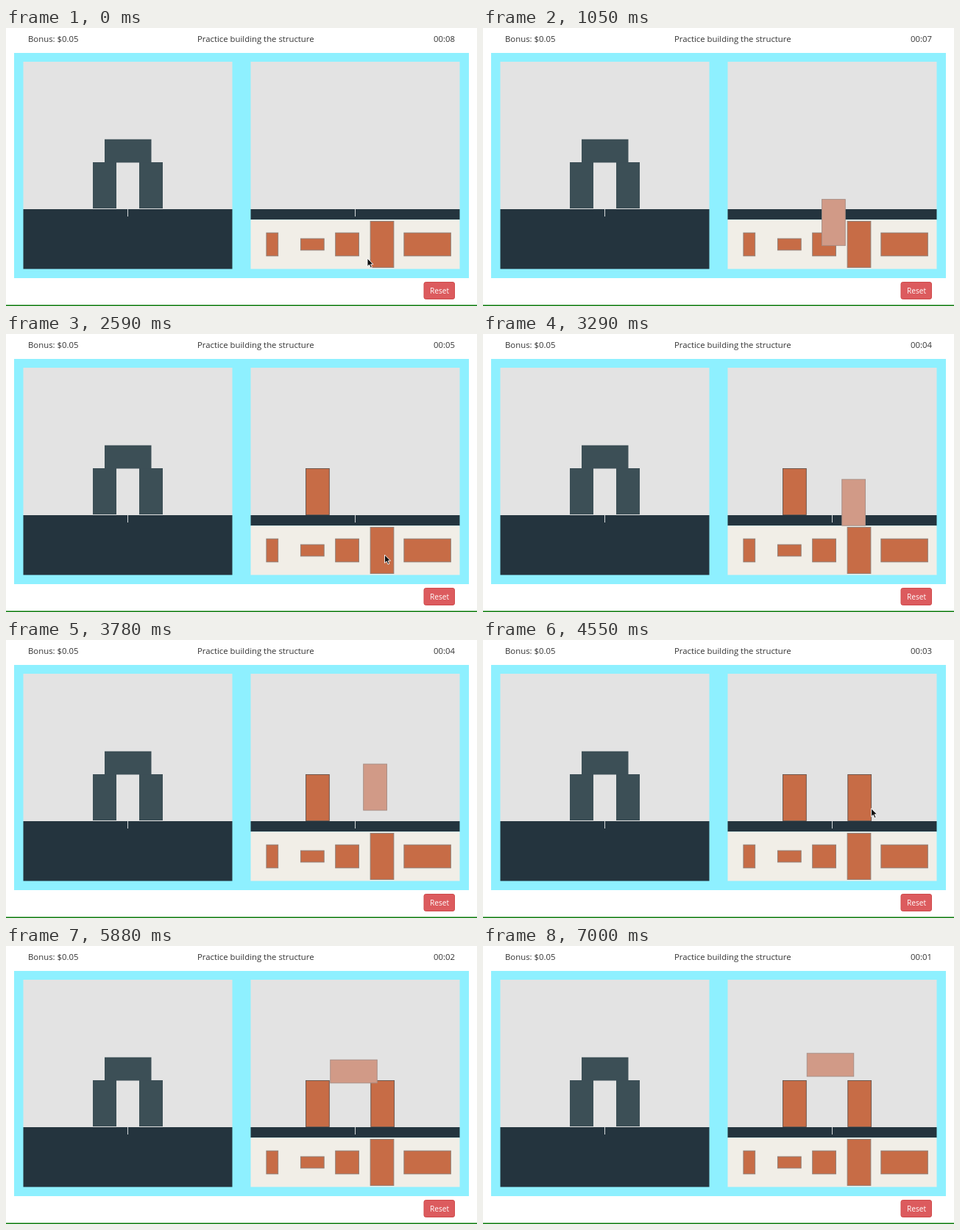
Animation, 640 px wide and 379 px high, one loop 7.07 s. Source, as an HTML page:

```html
<!DOCTYPE html>
<html lang="en">
<head>
<meta charset="utf-8">
<title>Block building practice</title>
<style>
  html, body { margin: 0; width: 100%; height: 100%; overflow: hidden; background: #fff; }
  svg { display: block; width: 100%; height: 100%; }
  text { font: 11.35px "Open Sans", sans-serif; fill: #333; }
  .ground { fill: #24343e; }
  .sky { fill: #e3e3e3; }
  .model { fill: #3c4f56; }
  .tick { stroke: #d5d9db; stroke-width: 1; }
  .block { fill: #c76c46; stroke: #8d7d75; stroke-width: .9; }
  .placed { stroke: #64524b; }
  .ghost { fill: #d19a87; stroke: #a58c83; }
</style>
</head>
<body>
<svg viewBox="0 0 640 379">
  <rect width="640" height="379" fill="#fff"/>
  <text x="30" y="18.6">Bonus: $0.05</text>
  <text x="260" y="18.6">Practice building the structure</text>
  <text x="581" y="18.6" id="timer">00:08</text>

  <rect x="11" y="34" width="618" height="307" fill="#8ef0ff"/>
  <rect class="sky" x="23.5" y="46" width="284" height="201"/>
  <rect class="ground" x="23.5" y="247" width="284" height="81.5"/>
  <g class="model">
    <rect x="118" y="183" width="32" height="63"/>
    <rect x="181" y="183" width="32" height="63"/>
    <rect x="134" y="151.7" width="63.5" height="31.8"/>
  </g>
  <path class="tick" d="M165.5 247v10"/>

  <rect class="sky" x="332.5" y="46" width="284" height="201"/>
  <rect class="ground" x="332.5" y="247" width="284" height="14.3"/>
  <path class="tick" d="M474.5 247v10"/>
  <rect x="332.5" y="261.3" width="284" height="67.2" fill="#f1eee7"/>
  <g id="blocks"></g>

  <rect x="568" y="346.5" width="41.5" height="23" rx="2.5" fill="#dc5b5e" stroke="#cf4a4b"/>
  <text x="576" y="361.7" style="font-size:10.15px;fill:#fff">Reset</text>
  <rect y="377.5" width="640" height="1.5" fill="#0b7a0b"/>
  <path id="cursor" d="M0 0V11.2L2.6 8.8L4.5 13L6.4 12.2L4.6 8.1H8Z" fill="#111" stroke="#fff" stroke-width=".9"/>
</svg>
<script>
  const LOOP = 7070, STEP = 70, FIRST_TICK = 280;
  const byId = id => document.getElementById(id);
  const layer = byId("blocks"), cursor = byId("cursor"), timer = byId("timer");

  function addBlock(cx, cy, w, h, kind = "") {
    const rect = document.createElementNS("http://www.w3.org/2000/svg", "rect");
    const attrs = { x: cx - w / 2, y: cy - h / 2, width: w, height: h, class: "block " + kind };
    for (const name in attrs) rect.setAttribute(name, attrs[name]);
    return layer.appendChild(rect);
  }

  const TALL = [31.8, 63], WIDE = [63.5, 31.6];
  addBlock(361.8, 295, 15.8, 31.6);
  addBlock(416.3, 295, 31.8, 15.8);
  addBlock(463.6, 295, 31.8, 31.6);
  addBlock(511, 295, ...TALL);
  addBlock(572.6, 295, ...WIDE);

  // Each drag shows a translucent block at the pointer; the drop leaves a solid one.
  const drags = [
    { from: 700, to: 2030, size: TALL, drop: [423.4, 215] },
    { from: 2800, to: 4270, size: TALL, drop: [511.7, 215] },
    { from: 5320, to: LOOP, size: WIDE }
  ];
  for (const d of drags) {
    if (d.drop) d.solid = addBlock(...d.drop, ...d.size, "placed");
    d.ghost = addBlock(0, 0, ...d.size, "ghost");
  }

  // Pointer path: time, x, y
  const path = [
    [0, 491, 314], [420, 511, 301], [700, 511, 299],
    [1540, 419, 209], [1750, 417.6, 211.5], [1960, 423, 213], [2100, 423, 213],
    [2520, 514.5, 301], [2800, 514.5, 301],
    [3570, 499, 199], [3780, 501.6, 200.6], [4130, 511, 211], [4340, 511, 211],
    [4970, 575, 283], [5320, 575, 283],
    [5810, 472.5, 171], [5950, 472.5, 171], [6580, 472, 162], [LOOP, 472, 162]
  ];

  function pointerAt(t) {
    const i = path.findIndex(p => p[0] > t);
    const [t0, x0, y0] = path[i - 1], [t1, x1, y1] = path[i];
    const u = (t - t0) / (t1 - t0), ease = u * u * (3 - 2 * u);
    return [x0 + (x1 - x0) * ease, y0 + (y1 - y0) * ease];
  }

  const show = (el, on) => el.setAttribute("visibility", on ? "visible" : "hidden");
  const move = (el, x, y) => el.setAttribute("transform", `translate(${x} ${y})`);

  function draw(now) {
    const t = Math.floor((now % LOOP) / STEP) * STEP;
    const [x, y] = pointerAt(t);
    let dragging = false;
    for (const d of drags) {
      const active = t >= d.from && t < d.to;
      dragging ||= active;
      show(d.ghost, active);
      move(d.ghost, x, y);
      if (d.solid) show(d.solid, t >= d.to);
    }
    show(cursor, !dragging);
    move(cursor, x, y);
    timer.textContent = "00:0" + (7 - Math.floor((t - FIRST_TICK) / 1000));
    requestAnimationFrame(draw);
  }
  draw(0);
</script>
</body>
</html>
```
